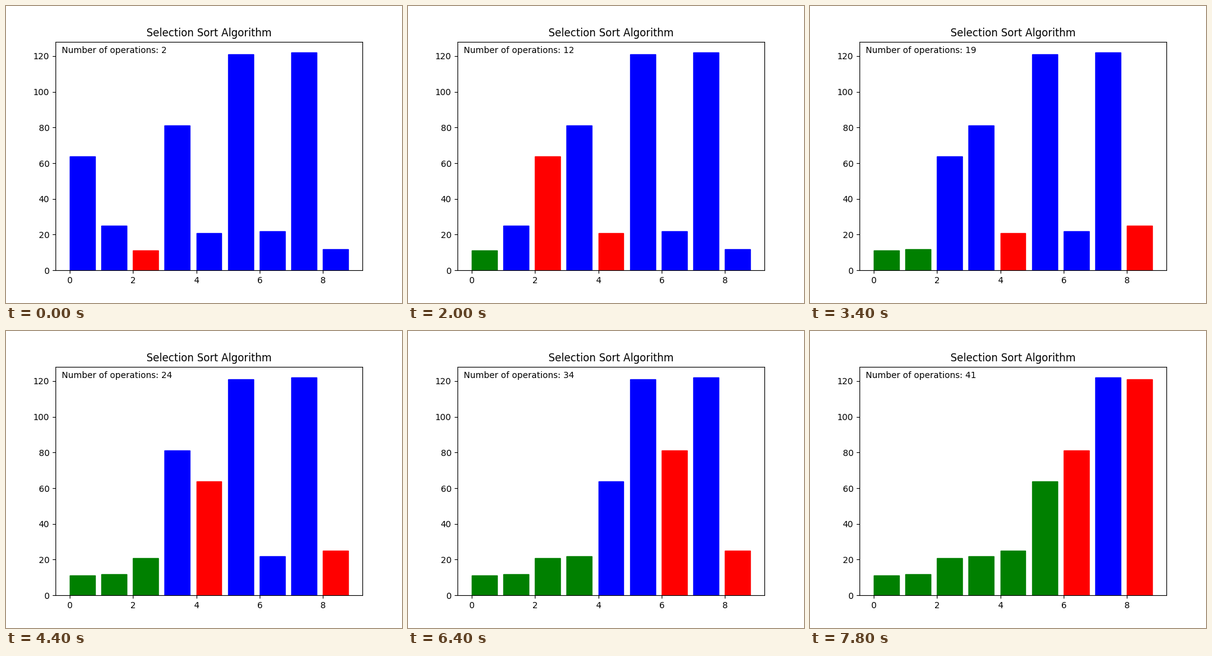
A matplotlib script that plays this animation: 640 by 480 pixels, repeating every 8 s.

```python
from itertools import islice

import matplotlib.pyplot as plt
from matplotlib.animation import FuncAnimation

VALUES = [64, 25, 11, 81, 21, 121, 22, 122, 12]
FIRST_OP = 2
FRAMES = 40
INTERVAL = 200


def selection_sort(values):
    """Yield (heights, colors) after every comparison and every swap."""
    heights = list(values)
    colors = ["blue"] * len(heights)
    for i in range(len(heights) - 1):
        low = i
        colors[low] = "red"
        for j in range(i + 1, len(heights)):
            if heights[j] < heights[low]:
                colors[low] = "blue"
                low = j
                colors[low] = "red"
            yield heights[:], colors[:]
        heights[i], heights[low] = heights[low], heights[i]
        colors[i] = "green"
        yield heights[:], colors[:]


states = list(islice(selection_sort(VALUES), FIRST_OP - 1, FIRST_OP - 1 + FRAMES))

fig, ax = plt.subplots(figsize=(6.4, 4.8), dpi=100)
ax.set_title("Selection Sort Algorithm")
bars = ax.bar(range(len(VALUES)), VALUES, align="edge")
ax.set_xlim(-0.44, 9.24)
ax.set_ylim(0, 1.05 * max(VALUES))
label = ax.text(0.02, 0.95, "", transform=ax.transAxes)


def update(frame):
    heights, colors = states[frame]
    for bar, height, color in zip(bars, heights, colors):
        bar.set_height(height)
        bar.set_color(color)
    label.set_text(f"Number of operations: {frame + FIRST_OP}")
    return [*bars, label]


anim = FuncAnimation(fig, update, frames=FRAMES, interval=INTERVAL, repeat=True)
plt.show()
```
